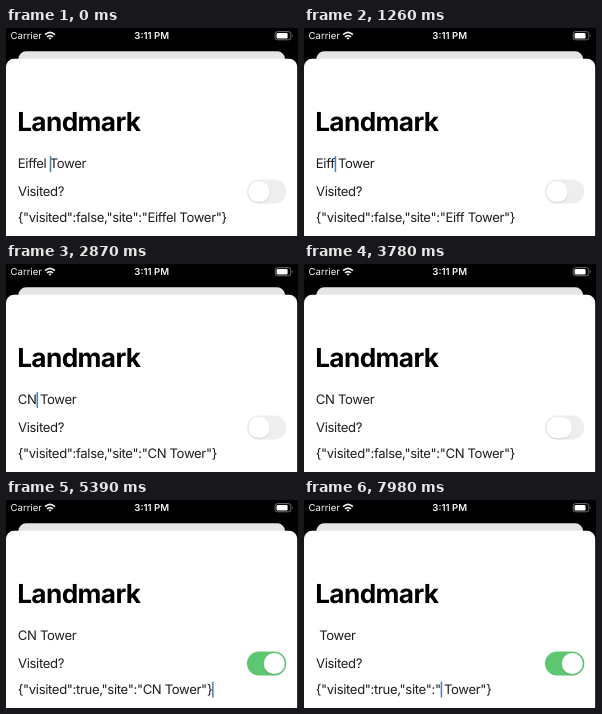
An HTML page for the animation above (8000 ms loop, 292 px wide and 208 px high).

```html
<!DOCTYPE html>
<html lang="en">
<head>
<meta charset="utf-8">
<title>Landmark form</title>
<style>
html, body { margin: 0; width: 100%; height: 100%; overflow: hidden; background: #000; }
svg { display: block; width: 292px; height: 208px; }
text { font-family: Inter, Roboto, sans-serif; white-space: pre; text-rendering: geometricPrecision; }
.body { font-size: 13.1px; letter-spacing: -.34px; fill: #1c1c1c; }
.title { font-size: 26.2px; font-weight: 700; letter-spacing: -.62px; }
.status { font-size: 9.6px; fill: #f4f4f4; }
.clock { font-weight: 600; text-anchor: middle; }
</style>
</head>
<body>
<svg viewBox="0 0 292 208">
  <defs>
    <filter id="shadow" x="-30%" y="-30%" width="160%" height="170%">
      <feDropShadow dx="0" dy="1" stdDeviation="1.2" flood-opacity=".13"/>
    </filter>
  </defs>
  <rect width="292" height="208"/>
  <text class="status" x="4.5" y="11.3">Carrier</text>
  <g fill="none" stroke="#f4f4f4" stroke-width="1.6">
    <path d="M39.1 6.7Q44 2.2 48.9 6.7M41 8.9Q44 6.2 47 8.9"/>
    <path d="M42.4 10.1Q44 8.8 45.6 10.1L44 11.8Z" fill="#f4f4f4" stroke="none"/>
  </g>
  <text class="status clock" x="145.7" y="11.3">3:11 PM</text>
  <rect x="269.2" y="3.6" width="15.6" height="8.2" rx="2.3" fill="none" stroke="#888" stroke-width=".8"/>
  <rect x="270.6" y="5" width="11" height="5.4" rx="1.2" fill="#fff"/>
  <path d="M286 6.3q1.4 1.4 0 2.8z" fill="#888"/>
  <rect x="12.2" y="23.3" width="267" height="30" rx="8" fill="#e5e5e5"/>
  <rect y="30.8" width="291.2" height="200" rx="8" fill="#fff"/>
  <text class="title" x="11.2" y="103.2">Landmark</text>
  <text class="body" id="site" x="11.8" y="140.2"></text>
  <text class="body" x="12" y="168">Visited?</text>
  <text class="body" id="json" x="11.8" y="194"></text>
  <rect id="track" x="241" y="151.5" width="39.3" height="24" rx="12"/>
  <rect id="knob" y="153" height="21" rx="10.5" fill="#fff" filter="url(#shadow)"/>
  <rect id="caret" width="1.5" height="16" rx=".5" fill="#4c7cc4"/>
</svg>
<script>
const LOOP = 8000, STEP = 70;
const $ = id => document.getElementById(id);
const [site, json, track, knob, caret] = ['site', 'json', 'track', 'knob', 'caret'].map($);

// time, site name, focused field, caret index, time before blinking
const edits = [
  [0, 'Eiffel Tower', site, 7],
  [70, 'Eiffel Tower', site, 6],
  [1050, 'Eiffe Tower', site, 5],
  [1260, 'Eiff Tower', site, 4],
  [1400, 'Eif Tower', site, 3],
  [1610, 'Ei Tower', site, 2],
  [1820, 'E Tower', site, 1],
  [2030, ' Tower', site, 0],
  [2520, 'C Tower', site, 1],
  [2870, 'CN Tower', site, 2],
  [5390, 'CN Tower', json, 34],
  [6230, 'CN Tower', json, 27, 560],
  [7140, 'CN Tower', json, 26],
  [7560, 'C Tower', json, 25],
  [7980, ' Tower', json, 24]
];

const clamp = v => Math.max(0, Math.min(1, v));
const ease = v => { v = clamp(v); return v * v * (3 - 2 * v); };
const mix = (a, b, k) => a + (b - a) * k;

function blink(age, hold = 630) {
  if (age < hold) return 1;
  const phase = (age - hold) % 910;
  return phase < 490 ? clamp(.65 - phase / 210) : clamp((phase - 490) / 140);
}

function setText(el, value) {
  if (el.textContent !== value) el.textContent = value;
}

function drawToggle(t) {
  const on = ease((t - 3780) / 350);
  const press = ease((t - 3570) / 210) * (1 - ease((t - 3920) / 280));
  const width = 21 + 4.5 * press;
  knob.setAttribute('width', width);
  knob.setAttribute('x', mix(242.5, 278.8 - width, on));
  const rgb = [[238, 94], [238, 199], [239, 114]].map(([a, b]) => Math.round(mix(a, b, on)));
  track.setAttribute('fill', `rgb(${rgb})`);
}

function draw(t) {
  const [start, name, field, index, hold] = edits.findLast(e => e[0] <= t);
  setText(site, name);
  setText(json, `{"visited":${t >= 3920},"site":"${name}"}`);
  const x = 12 + (index ? field.getSubStringLength(0, index) : 0);
  caret.setAttribute('x', x - .2);
  caret.setAttribute('y', field === site ? 128 : 181.5);
  caret.setAttribute('opacity', blink(t - start, hold));
  drawToggle(t);
}

const origin = performance.now();
function tick() {
  const t = (performance.now() - origin) % LOOP;
  draw(Math.floor(t / STEP) * STEP);
  requestAnimationFrame(tick);
}
tick();
</script>
</body>
</html>
```
